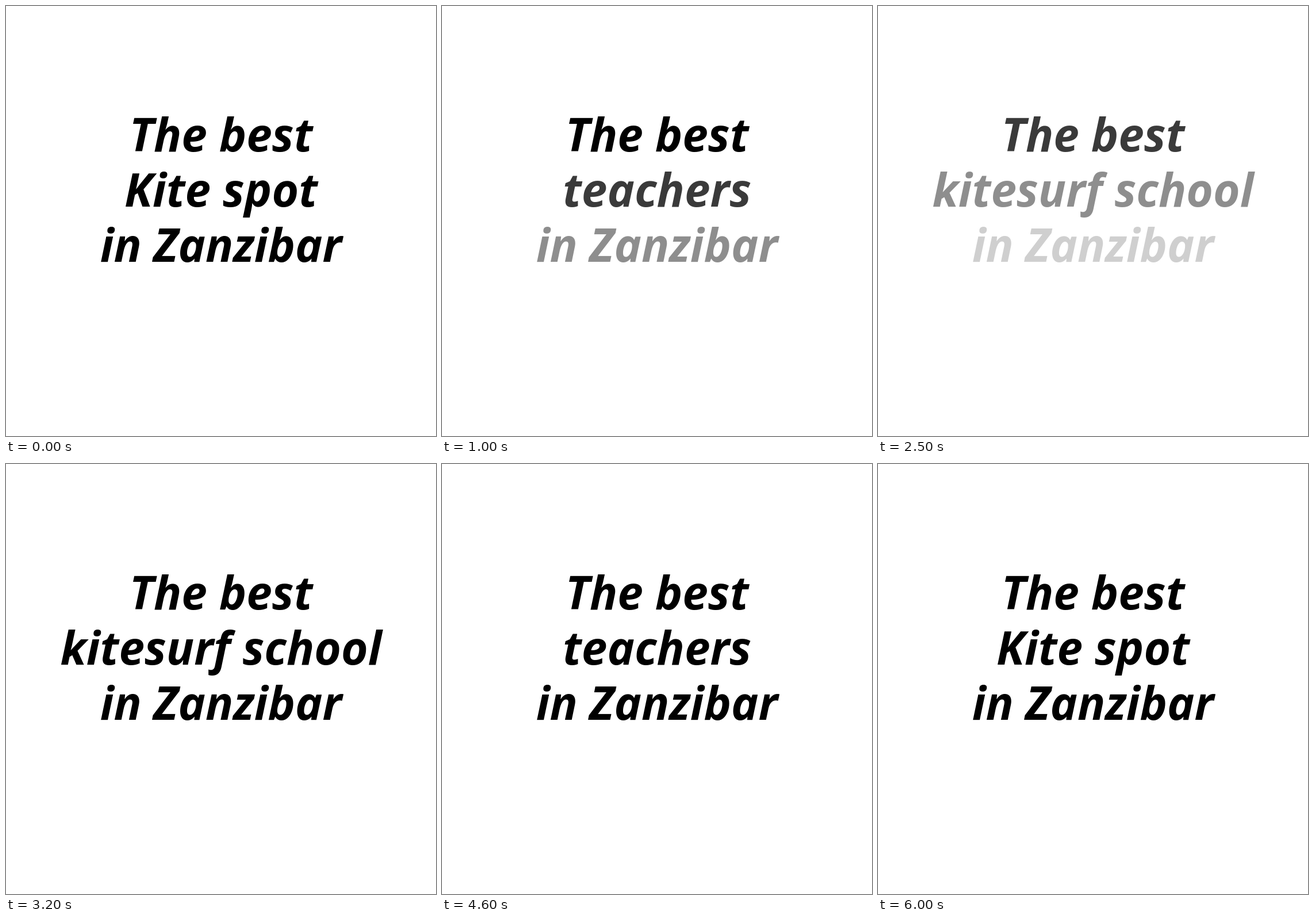
These frames come from a looping animation (748 by 748 pixels, 6100 ms). An HTML page:

```html
<!DOCTYPE html>
<html lang="en">
<head>
<meta charset="utf-8">
<title>The best in Zanzibar</title>
<style>
  html, body { margin: 0; width: 100%; height: 100%; overflow: hidden; background: #fff; }
  svg { display: block; width: 100%; height: 100%; }
  text { font: italic 700 80px "Open Sans", "Noto Sans", sans-serif; text-anchor: middle; }
</style>
</head>
<body>
<svg viewBox="0 0 748 748">
  <text x="374" y="253">The best</text>
  <text x="374" y="349">Kite spot</text>
  <text x="374" y="445">in Zanzibar</text>
</svg>
<script>
const STEP = 100;
const LAST_STEP = 60;
const FADE = 400;
const STAGGER = 100;
const slides = [
  { phrase: "Kite spot", cut: 0, fadeStart: -1000 },
  { phrase: "teachers", cut: 600, fadeStart: 560 },
  { phrase: "kitesurf school", cut: 2200, fadeStart: 2160 },
];
const lines = [...document.querySelectorAll("text")];
const clamp = v => Math.min(1, Math.max(0, v));

function draw(now) {
  // The sequence plays forward, then backward, in whole steps.
  const step = Math.floor(now / STEP) % (LAST_STEP + 1);
  const time = Math.min(step, LAST_STEP - step) * STEP;
  const slide = slides.findLast(s => time >= s.cut);

  lines[1].textContent = slide.phrase;
  lines.forEach((line, i) => {
    const progress = clamp((time - slide.fadeStart - i * STAGGER) / FADE);
    line.setAttribute("fill-opacity", progress ** 1.6);
  });
}

const start = performance.now();
function tick() {
  draw(performance.now() - start);
  requestAnimationFrame(tick);
}
tick();
</script>
</body>
</html>
```
